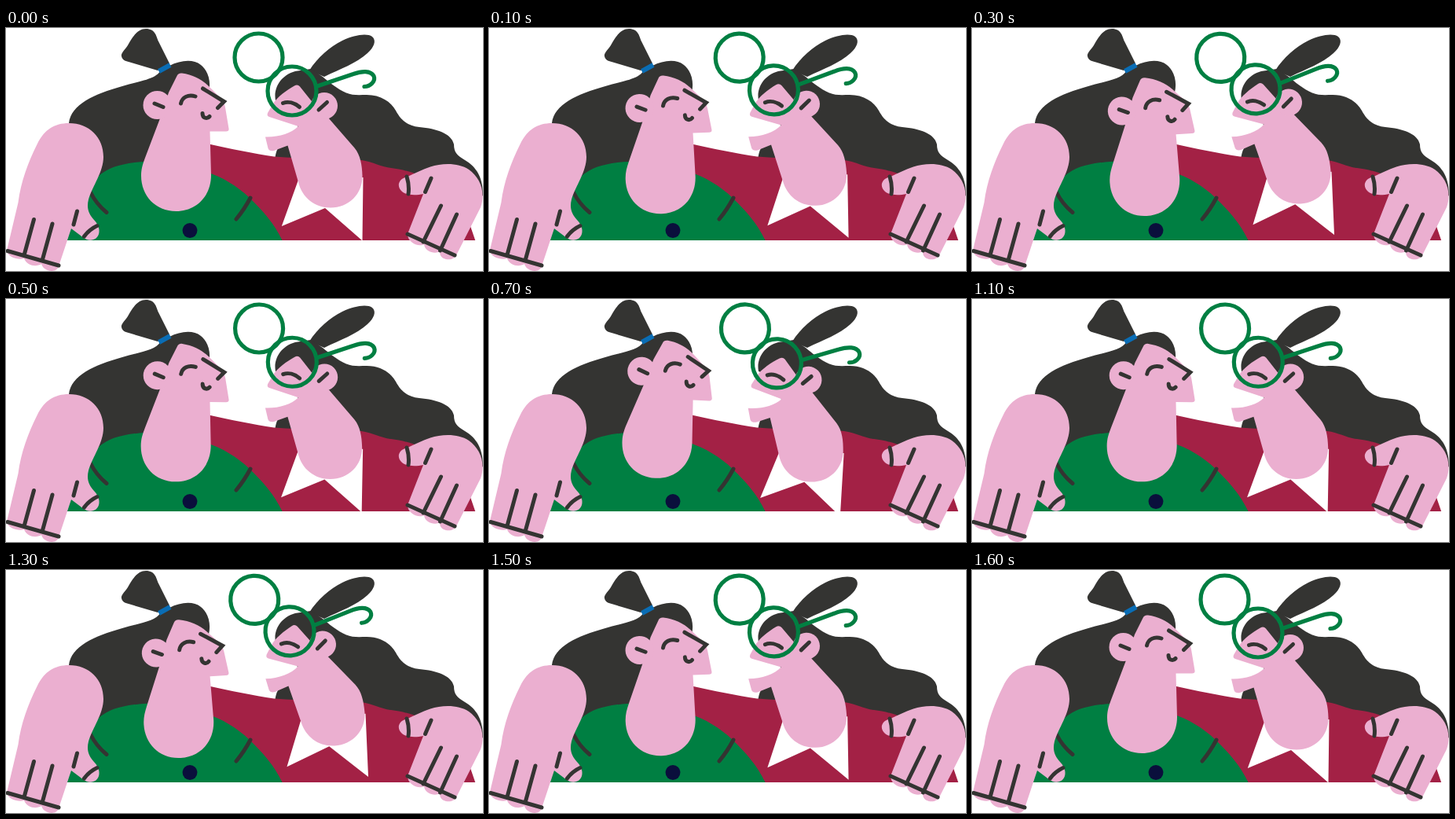
An HTML page that plays this animation: 607x309 px, repeating every 1.7 s.

```html
<!DOCTYPE html>
<html lang="en">
<head>
<meta charset="utf-8">
<title>Laughing friends</title>
<style>
  html, body { margin: 0; width: 100%; height: 100%; overflow: hidden; background: #fff; }
  svg { display: block; width: 100vw; height: 100vh; }
  .hair { fill: #343432; }
  .skin { fill: #ebafd0; }
  .red { fill: #a32145; }
  .green { fill: #007f42; }
  .ink { fill: none; stroke: #343432; stroke-width: 5; stroke-linecap: round; stroke-linejoin: miter; }
  .frame { fill: none; stroke: #007f42; stroke-width: 5.2; stroke-linecap: round; }
</style>
</head>
<body>
<svg viewBox="0 0 607 309" preserveAspectRatio="none">
  <defs>
    <clipPath id="table"><rect width="607" height="270"/></clipPath>
  </defs>

  <!-- hair -->
  <g class="hair">
    <path d="M147 36C146 32 151 28 155 22C160 14 166 1 178 1C190 1 191 10 194 17L208 45L193 54L156 43C151 42 148 40 147 36Z"/>
    <path d="M196 55C190 65 172 67 148 74C112 84 83 97 80 121C80 150 95 180 110 215H205V120L225 100L258 82C261 69 258 55 248 47C238 39 222 41 208 48Z"/>
    <path d="M386 54C396 38 412 24 428 16C443 9 459 6 466 11C472 16 468 25 460 32C446 45 425 52 405 62Z"/>
    <path d="M343 92C340 76 350 60 368 55L388 52L403 62C410 68 422 78 433 82.500C441 86 450 85 459 85C477 85 490 94 496 105C503 118 511 124 526 126C548 128 567 134 570 148C570 158 574 162 584 168C599 177 607 190 607 213L570 240H420L400 180H340C343 170 341 157 349 149L375 140L365 100Z"/>
  </g>
  <path d="M194.500 55L209 47" stroke="#0a6db5" stroke-width="6"/>

  <!-- bodies -->
  <g clip-path="url(#table)">
    <path class="red" d="M250 146L258 147.500C285 153.500 315 159.500 341 163.500C380 167 420 165 452 168C467 170 478 177 490 178C508 180 530 187 540 196L580 220L597.500 271H250Z"/>
    <path class="green" d="M70 271L106 208C112 191 120 185 132 179C150 171 180 168 210 171C230 173 247 178.500 262 185.500C282 193 301 206 316 222C333 239 344 254 352 271Z"/>
  </g>
  <circle cx="234" cy="257.500" r="9.400" fill="#0a0f3c"/>
  <path class="ink" d="M107.500 209C112 218 120 228 128 234.500M311 216Q303 231 293 243"/>

  <!-- swaying heads -->
  <g clip-path="url(#table)">
    <g id="heads">
      <path fill="#fff" d="M373.500 189L350.800 252L406 229L453.500 270.500L454.500 190Z"/>

      <path class="skin" d="M207 82L217.500 61Q219 57 224 57.500C238 59.500 250 66 258 74L275 91Q278 95 279 101L283.500 128Q284 131.500 280 131.500H259.500L261 187C261 214 242 233 216.500 233C190 233 172 213 172 188C172 179 174 173 177 165L196 115Z"/>
      <circle class="skin" cx="192.500" cy="98" r="18"/>
      <path class="ink" d="M189 96L200 100.500M222.500 96C224 88 232 84 241 87M250 108.500C250 115 256 116 259 112.500M250.500 77L277.500 93.500L269.500 101.500"/>

      <path class="skin" d="M367 73.500Q371 71 374 74.500L392 97L410 114L443.500 152.500C451 161.500 453 174 453.500 188C454 211 436 228.500 413 228.500C393 228.500 377 216 372 196L358.500 149.500L341 156Q335 157 333.500 153L330 138.500C347 139 363 134 372 125L335 113Q331.500 112 333 108L340 96C345 88 357 79 367 73.500Z"/>
      <circle class="skin" cx="405" cy="99" r="17"/>
      <path class="ink" d="M352.500 95.500C359 93 367 95 373.500 100.500M398 104L408.500 94.500"/>
      <g class="frame">
        <circle cx="321.500" cy="37.500" r="30.500"/>
        <circle cx="364" cy="80" r="31"/>
        <path d="M396 74L442 58.500C453 54.500 464 54 468 61C471 68 463 74.500 456 74.500"/>
      </g>
    </g>
  </g>

  <!-- hands -->
  <path class="skin" d="M1 283L15.500 222C19 195 28 171 40 147C49 129 62 121 80 121C106 121 124 139 124 164C124 183 110 201 105 218C102 230 106 237 112 244C119 251 121 261 115 267C110 271 103 270 99 267L83 255L67 303C65 309 59 310 53 308C48 306 46 303 45 300C39 304 27 303 23 293C17 295 3 293 1 283Z"/>
  <path class="ink" d="M2 283.500L67 302M35.500 243.500L23 289M59 249L46 296M90.500 233L86 250M99.500 265Q106 256 116 251.500"/>
  <path class="skin" d="M511 189C520 185 530 180 540 176.500C555 171.500 576 171 589 180C603 190 611 208 604 228L574 287C572 294 563 296 557 293C553 291 552 288 552 284C547 288 533 285 532 275C525 279 511 273 511 262L531 211C522 213 510 213 504 208C496 201 500 191 511 189Z"/>
  <path class="ink" d="M510 189Q513.500 200 512 211M541 191L533.500 208.500M553.500 226L531 272M573.500 237L552.500 283M511 262L571 289"/>
</svg>
<script>
  const STEP = 100, COUNT = 17;
  // Tilt in degrees for half of the sway; the second half retraces it.
  const tilt = [0, -1.7, -3, -3.2, -1.6, 0.35, 1.75, 2.7, 3.4];
  const heads = document.getElementById('heads');

  function draw(ms) {
    const n = Math.floor(ms / STEP) % COUNT;
    const angle = tilt[n < tilt.length ? n : COUNT - 1 - n];
    heads.setAttribute('transform', `rotate(${angle} 325 132)`);
  }

  const start = performance.now();
  function tick() {
    draw(performance.now() - start);
    requestAnimationFrame(tick);
  }
  tick();
</script>
</body>
</html>
```
